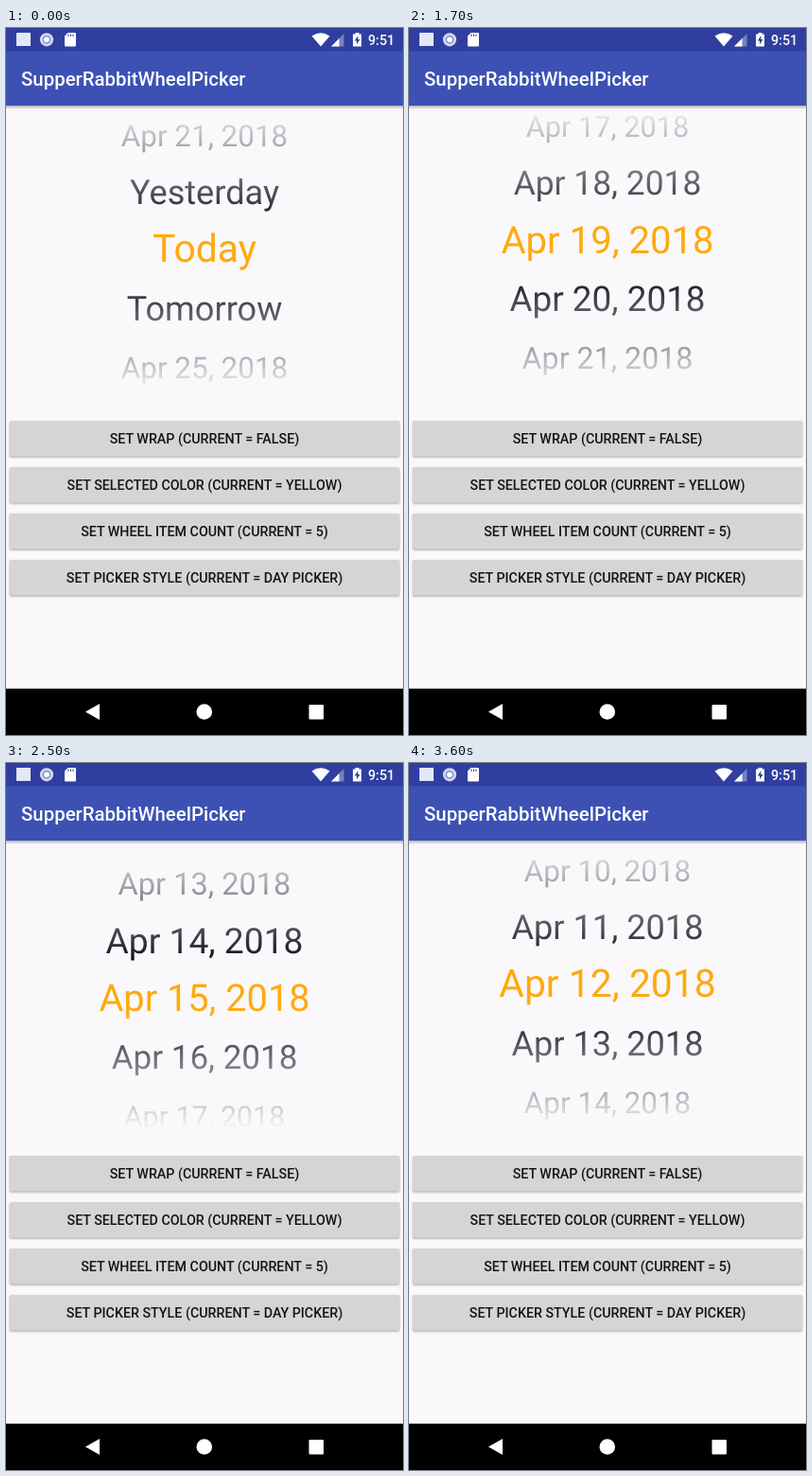
Recreate the animation shown at these times as an HTML page. Size 420 by 747 pixels, loop 3900 ms.

```html
<!DOCTYPE html>
<html lang="en">
<head>
<meta charset="utf-8">
<title>Wheel picker</title>
<style>
  html, body { margin: 0; height: 100%; overflow: hidden; background: #faf8fb; }
  svg { display: block; width: 100vw; height: 100vh; font-family: Roboto, Arial, sans-serif; }
  .medium { font-weight: 500; }
  #wheel, #buttons { text-anchor: middle; }
  #wheel { text-rendering: geometricPrecision; }
  #buttons rect { fill: #d6d4d7; filter: drop-shadow(0 1px 1px rgba(0, 0, 0, .35)); }
  #buttons text { font-size: 14.29px; fill: #141416; }
</style>
</head>
<body>
<svg viewBox="0 0 420 747">
  <defs>
    <linearGradient id="plain" gradientUnits="userSpaceOnUse" x1="0" x2="0" y1="82" y2="387"></linearGradient>
    <linearGradient id="chosen" gradientUnits="userSpaceOnUse" x1="0" x2="0" y1="82" y2="387"></linearGradient>
    <linearGradient id="shade" x1="0" x2="0" y1="0" y2="1">
      <stop offset="0" stop-opacity=".28"/>
      <stop offset="1" stop-opacity="0"/>
    </linearGradient>
    <clipPath id="window"><rect y="82" width="420" height="305"/></clipPath>
  </defs>

  <rect width="420" height="747" fill="#faf8fb"/>
  <g id="wheel" clip-path="url(#window)"></g>
  <g id="buttons" class="medium"></g>

  <!-- app bar -->
  <rect y="82" width="420" height="4" fill="url(#shade)"/>
  <rect y="24" width="420" height="58" fill="#3d51b5"/>
  <text class="medium" x="16" y="61.3" font-size="20.42" fill="#fff">SupperRabbitWheelPicker</text>

  <!-- status bar -->
  <rect width="420" height="24.5" fill="#303f9f"/>
  <g fill="#fff">
    <rect x="11" y="5" width="15" height="14" fill="#e4e7f5"/>
    <circle cx="43" cy="12.3" r="5.8" fill="#8d97cf" stroke="#d5d9ef" stroke-width="2.6"/>
    <circle cx="43" cy="12.3" r="2.8"/>
    <path d="M65.500 5H73Q74 5 74 6V18.500Q74 19.500 73 19.500H63Q62 19.500 62 18.500V8.500Z"/>
    <path d="M66 6.500V9M68.500 6.500V9M71 6.500V9" stroke="#303f9f"/>
    <path d="M323.500 8.500Q333 2 342.500 8.500L333 19.500Z"/>
    <path d="M344 19.500L357.500 6V19.500Z" opacity=".35"/>
    <path d="M344 19.500L352.500 11V19.500Z"/>
    <path d="M367 6.500H369.500V5H373.500V6.500H376V19.500H367Z"/>
    <path d="M372.300 8L368.800 13.500H371V17.500L374.400 12H372.300Z" fill="#303f9f"/>
    <text class="medium" x="383" y="17.6" font-size="14.29">9:51</text>
  </g>

  <!-- navigation bar -->
  <rect y="698" width="420" height="49"/>
  <g fill="#fff">
    <path d="M84 722.500L99 714V731Z"/>
    <circle cx="209.800" cy="722.500" r="8.300"/>
    <rect x="320.500" y="715" width="15.500" height="15.500" rx="1"/>
  </g>
</svg>
<script>
const LOOP = 3900, STEP = 100, TODAY = 23;
const CENTER = 247.4, PITCH = 61.2, SIZE = 40.83;

// time, centred day, ease-out power of the way to it
const keys = [
  [1300, 23, 1], [1400, 22.55, 1], [1900, 16.9, 1],
  [2500, 14.765, 2.5], [3000, 11.88, 1.6], [3600, 12, 2]
];
const names = { [TODAY - 1]: 'Yesterday', [TODAY]: 'Today', [TODAY + 1]: 'Tomorrow' };
const byId = id => document.getElementById(id);

function add(parent, tag, attrs, text = '') {
  const el = document.createElementNS('http://www.w3.org/2000/svg', tag);
  set(el, attrs);
  el.textContent = text;
  return parent.appendChild(el);
}

function set(el, attrs) {
  for (const k in attrs) el.setAttribute(k, attrs[k]);
}

function fade(id, color) {
  [[0, 0], [.433, 1], [.567, 1], [1, 0]].forEach(([offset, alpha]) =>
    add(byId(id), 'stop', { offset, 'stop-color': color, 'stop-opacity': alpha }));
}
fade('plain', '#03070f');
fade('chosen', '#ffa90a');

['WRAP (CURRENT = FALSE)', 'SELECTED COLOR (CURRENT = YELLOW)',
 'WHEEL ITEM COUNT (CURRENT = 5)', 'PICKER STYLE (CURRENT = DAY PICKER)'
].forEach((label, i) => {
  const y = 415 + 49 * i;
  add(byId('buttons'), 'rect', { x: 4, y, width: 412, height: 37.5, rx: 1 });
  add(byId('buttons'), 'text', { x: 210, y: y + 24 }, 'SET ' + label);
});

const rows = Array.from({ length: 7 }, () => add(byId('wheel'), 'text', { x: 210 }));

function position(t) {
  const i = keys.findIndex(k => t < k[0]);
  if (i < 0) return keys[keys.length - 1][1];
  if (i === 0) return keys[0][1];
  const [t0, p0] = keys[i - 1], [t1, p1, power] = keys[i];
  return p1 + (p0 - p1) * (1 - (t - t0) / (t1 - t0)) ** power;
}

function draw(t) {
  const p = position(Math.floor(t / STEP) * STEP), middle = Math.round(p);
  rows.forEach((row, i) => {
    const day = middle + i - 3, d = day - p;
    row.textContent = names[day] || `Apr ${day}, 2018`;
    set(row, {
      y: CENTER + PITCH * d,
      'font-size': SIZE * (1 - .115 * Math.abs(d)),
      fill: `url(#${day === middle ? 'chosen' : 'plain'})`
    });
  });
}

const start = performance.now();
function tick() {
  draw((performance.now() - start) % LOOP);
  requestAnimationFrame(tick);
}
tick();
</script>
</body>
</html>
```
